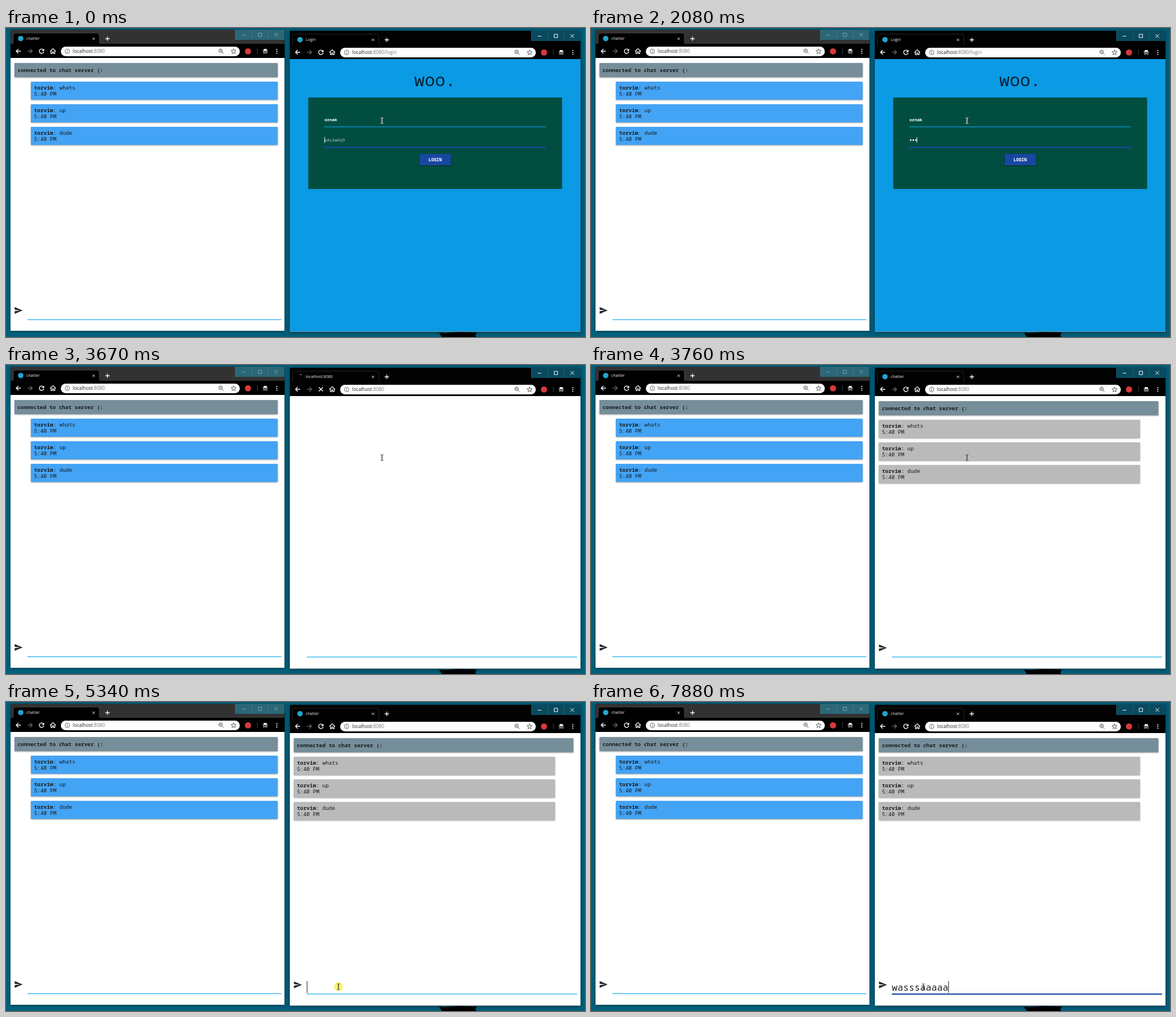
Write an HTML page with a canvas that moves like this. It is 1024 px wide and 547 px high and loops after 8 s.

```html
<!DOCTYPE html>
<html lang="en">
<head>
<meta charset="utf-8">
<title>chatter</title>
<style>
html, body { margin: 0; width: 100%; height: 100%; overflow: hidden; background: #02607b; }
canvas { display: block; width: 1024px; height: 547px; }
</style>
</head>
<body>
<canvas id="stage"></canvas>
<script>
const LOOP = 8000, W = 1024, H = 547;
const MONO = '"Noto Sans Mono", "DejaVu Sans Mono", monospace';
const SANS = '"Open Sans", "Noto Sans", sans-serif';
const INK = '#161b1f', CYAN = '#19a9ee', NAVY = '#1747a1';
const USER = 'torvim', GUEST = 'ornak';
const WORDS = ['whats', 'up', 'dude'];
const MESSAGE = 'wasssaaaaa';
const DOT_TIMES = [1510, 1610, 2080];
const KEY_TIMES = [5900, 6000, 6670, 6830, 7010, 7310, 7410, 7580, 7780, 7880];

const canvas = document.getElementById('stage');
const ctx = canvas.getContext('2d');
const dpr = window.devicePixelRatio || 1;
canvas.width = Math.round(W * dpr);
canvas.height = Math.round(H * dpr);

const within = (t, from, to) => t >= from && t < to;
const countPast = (times, t) => times.filter(v => t >= v).length;

function rect(x, y, w, h, color) {
  ctx.fillStyle = color;
  ctx.fillRect(x, y, w, h);
}

function rounded(x, y, w, h, r, color) {
  ctx.fillStyle = color;
  ctx.beginPath();
  ctx.roundRect(x, y, w, h, r);
  ctx.fill();
}

function circle(x, y, r, color) {
  ctx.fillStyle = color;
  ctx.beginPath();
  ctx.arc(x, y, r, 0, 7);
  ctx.fill();
}

function stroke(path, color, width = 1) {
  ctx.strokeStyle = color;
  ctx.lineWidth = width;
  ctx.stroke(new Path2D(path));
}

function at(x, y, draw) {
  ctx.save();
  ctx.translate(x, y);
  draw();
  ctx.restore();
}

function withShadow(color, blur, dy, draw) {
  ctx.save();
  ctx.shadowColor = color;
  ctx.shadowBlur = blur * dpr;
  ctx.shadowOffsetY = dy * dpr;
  draw();
  ctx.restore();
}

function text(str, x, y, size, color, family = MONO, weight = 400, align = 'left') {
  ctx.font = `${weight} ${size}px ${family}`;
  ctx.fillStyle = color;
  ctx.textAlign = align;
  ctx.fillText(str, x, y);
  return ctx.measureText(str).width;
}

function backArrow(color) {
  stroke('M4.2 0H-3.8M0 -4L-4 0L0 4', color, 1.3);
}

function reloadIcon() {
  stroke('M3.2 -2.4A4 4 0 1 0 3.9 1', '#fff', 1.3);
  ctx.fillStyle = '#fff';
  ctx.fill(new Path2D('M4.5 -4.6V-0.2H0.1Z'));
}

function cross(r, color, width = 1) {
  stroke(`M${-r} ${-r}L${r} ${r}M${r} ${-r}L${-r} ${r}`, color, width);
}

function star() {
  let d = '';
  for (let i = 0; i < 10; i++) {
    const a = i * Math.PI / 5, r = i % 2 ? 2.1 : 4.8;
    d += (i ? 'L' : 'M') + Math.sin(a) * r + ' ' + -Math.cos(a) * r;
  }
  stroke(d + 'Z', '#444', 0.9);
}

function privateIcon() {
  ctx.fillStyle = '#e8e8e8';
  ctx.fill(new Path2D('M-2.6 -4H2.6L3.2 -1H-3.2ZM-4.6 -0.7H4.6V0.3H-4.6Z'));
  stroke('M-3.5 2.6a1.3 1.3 0 1 0 2.6 0a1.3 1.3 0 1 0 -2.6 0M0.9 2.6a1.3 1.3 0 1 0 2.6 0a1.3 1.3 0 1 0 -2.6 0M-1 2.3H1', '#e8e8e8', 0.9);
}

function windowButtons(w, active) {
  const glyph = active ? '#fff' : '#83a2ad';
  rect(w - 87, 0, 87, 18, active ? '#0a4a5f' : '#2b6777');
  for (const x of [87, 58, 29]) rect(w - x, 0, 0.7, 18, active ? '#2c6576' : '#497e8c');
  at(w - 72.5, 9, () => stroke('M-3 0.5H3', glyph));
  at(w - 43.5, 9, () => stroke('M-3 -3H3V3H-3Z', glyph));
  at(w - 14.5, 9, () => cross(3.2, glyph));
}

function toolbar(w, url, loading) {
  at(14, 38, () => backArrow('#fff'));
  at(34.5, 38, () => { ctx.scale(-1, 1); backArrow('#666'); });
  at(55, 38, () => loading ? cross(3.6, '#fff', 1.4) : reloadIcon());
  at(75, 38, () => stroke('M-5 0.2L0 -4.4L5 0.2M-3.4 -0.8V4.2H-1V1H1V4.2H3.4V-0.8', '#fff', 1.2));

  rounded(89, 30, w - 168, 17, 8.5, '#fff');
  at(100.5, 38.3, () => {
    stroke('M-4 0a4 4 0 1 0 8 0a4 4 0 1 0 -8 0M0 -0.6V2.4M0 -2.4V-1.3', '#555', 0.9);
  });
  const host = 'localhost';
  const hostWidth = text(host, 110, 41.3, 8.45, '#222', SANS);
  text(url.slice(host.length), 110 + hostWidth, 41.3, 8.45, '#777', SANS);
  at(w - 112, 38, () => stroke('M-4 -0.8a3 3 0 1 0 6 0a3 3 0 1 0 -6 0M1.2 1.4L4.2 4.4M-2.4 -0.8H0.4', '#444', 1));
  at(w - 90, 38.5, star);
  circle(w - 64.5, 38.3, 5.5, '#d8393b');
  rect(w - 48.5, 33, 1, 10, '#444');
  at(w - 34, 38, privateIcon);
  for (const dy of [-3.3, 0, 3.3]) circle(w - 13.5, 38.3 + dy, 1, '#fff');
}

function browser(x, y, w, h, opts) {
  const { active, title, url, loading, spin } = opts;
  withShadow('rgba(0,20,30,.55)', active ? 7 : 4, 1, () => rect(x, y, w, h, '#000'));
  at(x, y, () => {
    rect(0, 0, w, 25, active ? '#020202' : '#323232');
    rect(0, 25, w, 25, '#000');
    ctx.fillStyle = '#000';
    const tab = 'M2 25Q5 25 5 21V10Q5 6 9 6H153Q157 6 157 10V21Q157 25 160 25';
    ctx.fill(new Path2D(tab));
    stroke(tab, active ? '#303030' : '#4a4a4a', 0.8);
    if (spin) circle(spin, 12, 0.9, '#b9cfe4');
    else circle(18, 15.7, 4.8, '#22a6cf');
    text(title, 28, 18.4, 7.1, '#f2f2f2', SANS);
    at(147, 16, () => cross(2.2, '#ddd', 0.9));
    at(171.5, 16, () => stroke('M-3.8 0H3.8M0 -3.8V3.8', '#fff', 1.3));
    windowButtons(w, active);
    toolbar(w, url, loading);
    rect(0, 50, w, h - 50, '#fff');
  });
}

function panel(x, y, w, h, color) {
  withShadow('rgba(0,0,0,.4)', 2.5, 1, () => rounded(x, y, w, h, 1, color));
}

function chatLog(x, y, w, bubbleX, bubbleW, color) {
  panel(x, y, w, 25, '#768e99');
  text('connected to chat server (:', x + 5.5, y + 15.5, 9.37, INK, MONO, 700);
  WORDS.forEach((word, i) => {
    const top = y + 33 + i * 40;
    panel(bubbleX, top, bubbleW, 32, color);
    const nameWidth = text(USER, bubbleX + 5.7, top + 13.7, 9.37, INK, MONO, 700);
    text(': ' + word, bubbleX + 5.7 + nameWidth, top + 13.7, 9.37, INK);
    text('5:40 PM', bubbleX + 5.7, top + 24.6, 9.37, INK);
  });
}

function sendIcon(x, y) {
  at(x, y, () => {
    ctx.scale(2 / 3, 2 / 3);
    ctx.fillStyle = '#20252a';
    ctx.fill(new Path2D('M2 21L23 12L2 3V10L17 12L2 14Z'));
  });
}

function loginPage(t) {
  rect(502, 55, 514, 482, '#0b9ae4');
  text('woo.', 758.7, 102.5, 30.5, '#06202d', MONO, 400, 'center');
  rect(534.5, 123, 449, 162, '#014e41');
  text(GUEST, 563.2, 165.4, 7.55, '#fff', MONO, 700);
  rect(563, 174.3, 392, 1.3, '#0e97d6');

  const dots = countPast(DOT_TIMES, t);
  if (!dots) text('pAsSwOrD', 563.2, 201.2, 7.55, '#b4c9c4');
  for (let i = 0; i < dots; i++) circle(565.5 + i * 4.5, 198.5, 1.4, '#fff');
  const hidden = within(t, 300, 770) || within(t, 1330, 1510) || within(t, 2660, 3200);
  if (!hidden) rect(563 + Math.round(dots * 4.4), 193, 1, 10, '#e6efed');
  rect(563, 210, 392, 2.3, NAVY);

  withShadow('rgba(0,0,0,.4)', 3, 1, () => rounded(731.5, 223, 55, 20, 1, NAVY));
  text('LOGIN', 759, 236, 7.9, '#fff', MONO, 700, 'center');
}

function chatPage(t) {
  if (t >= 3760) {
    chatLog(509, 64, 494.5, 509, 462, '#bababa');
    sendIcon(508, 492.7);
  }
  if (t < 5440) rect(532, 516.3, 478, 1.2, CYAN);
  else rect(532, 516, 478, t < 5540 ? 1.6 : 2.2, t < 5540 ? '#1878c8' : NAVY);
  if (within(t, 5260, 5540)) {
    circle(588, 504, 7.8, t < 5440 ? '#fbf36b' : '#fdf9b8');
  }
  const typed = countPast(KEY_TIMES, t);
  text(MESSAGE.slice(0, typed), 532, 510.5, 16.67, '#1d2125');
  if (t >= 5340 && !within(t, 6560, 6670)) rect(532 + typed * 10, 494, 1, 21, '#222');
}

function beam(x, y, dark) {
  const d = 'M-2.7 -5H-0.9Q0 -5 0 -4V4Q0 5 -0.9 5H-2.7M2.7 -5H0.9Q0 -5 0 -4V4Q0 5 0.9 5H2.7';
  at(x, y, () => {
    if (!dark) stroke(d, '#13241f', 2.2);
    stroke(d, dark ? '#444' : '#dfe7e4', 1);
  });
}

function arrow(x, y) {
  at(x, y, () => {
    const p = 'M0 0V9.6L2.2 7.6L3.9 11.4L5.4 10.7L3.8 7.1H6.8Z';
    ctx.fillStyle = '#fff';
    ctx.fill(new Path2D(p));
    stroke(p, '#111', 0.8);
  });
}

function pointer(t) {
  if (t < 3480) return beam(665, 164, false);
  if (t < 3670) return arrow(665.3, 164);
  if (t < 4340) return beam(665, 164, true);
  if (t >= 5260) return beam(588, 504, true);
  const step = Math.min(8, Math.floor((t - 4340) / (640 / 7)) + 1);
  const u = step / 8, k = u * u * (3 - 2 * u);
  arrow(665 - 78.5 * k, 164 + 329 * k);
}

function draw(t) {
  ctx.setTransform(dpr, 0, 0, dpr, 0, 0);
  rect(0, 0, W, H, '#02607b');
  ctx.fillStyle = '#000';
  ctx.fill(new Path2D('M766 539L776 540L800 538L833 539L830 544L832 547H771L768 543Z'));

  browser(8, 3, 484.5, 533, { title: 'chatter', url: 'localhost:8080' });
  chatLog(15, 62, 465.5, 44, 436.5, '#43a3f4');
  sendIcon(14, 492);
  rect(38, 515.8, 449, 1.2, CYAN);

  const loading = within(t, 3480, 3760);
  const spin = loading && (t < 3610 ? 16.5 : t < 3670 ? 18 : 19.5);
  browser(502, 5, 514, 532.5, {
    active: true,
    title: t < 3610 ? 'Login' : t < 3760 ? 'localhost:8080' : 'chatter',
    url: t < 3610 ? 'localhost:8080/login' : 'localhost:8080',
    loading, spin
  });
  if (t < 3670) loginPage(t);
  else chatPage(t);
  pointer(t);
}

const start = performance.now();
function tick() {
  draw((performance.now() - start) % LOOP);
  requestAnimationFrame(tick);
}
tick();
</script>
</body>
</html>
```
